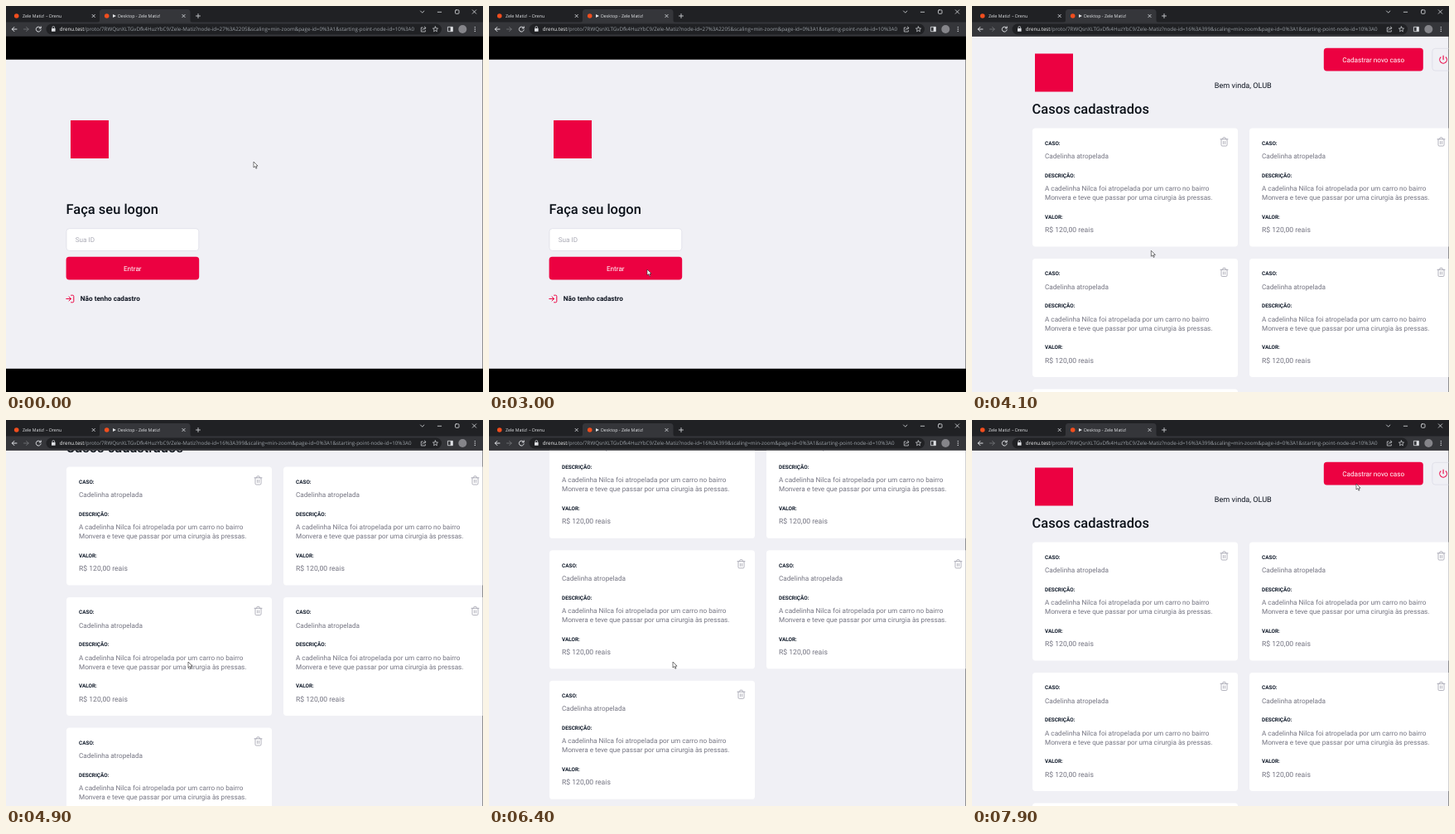
Write an HTML page that moves like this. It is 576x466 px and loops after 8 s.

```html
<!DOCTYPE html>
<html lang="pt">
<head>
<meta charset="utf-8">
<title>Zele Matiz</title>
<style>
  html, body { margin: 0; width: 100%; height: 100%; overflow: hidden; background: #000; }
  svg { display: block; width: 100%; height: 100%; text-rendering: geometricPrecision; }
  text { font-family: Roboto, sans-serif; white-space: pre; }
  .title { font-size: 16.45px; font-weight: 500; fill: #0a1018; }
  .label { font-size: 6.4px; font-weight: 700; fill: #0e1828; }
  .body { font-size: 8.18px; fill: #737380; }
  .price { font-size: 8.6px; fill: #737380; }
  .hint { font-size: 8.1px; fill: #a8a8b3; }
  .action { font-size: 8.2px; font-weight: 400; fill: #fff; text-anchor: middle; }
  .link { font-size: 8.2px; font-weight: 700; fill: #0e1420; }
  .greet { font-size: 9.1px; fill: #0e1420; }
  .chrome text { font-family: "Open Sans", "Noto Sans", sans-serif; }
  .tab { font-size: 5.3px; fill: #e4e6e9; }
  .url { font-size: 6.22px; fill: #9aa0a6; }
  .line { fill: none; stroke-linecap: round; stroke-linejoin: round; }
</style>
</head>
<body>
<svg viewBox="0 0 576 466" preserveAspectRatio="none">
  <defs>
    <clipPath id="urlClip"><rect x="50" y="20" width="445.5" height="16"/></clipPath>
    <clipPath id="viewClip"><rect y="36.5" width="575.6" height="430"/></clipPath>
    <g id="trash" class="line" stroke="#a0a0ac" stroke-width=".8">
      <path d="M0 2H9M2.8 2V.8Q2.8 0 3.6 0H5.4Q6.2 0 6.2 .8V2M1 2V9Q1 10.2 2.2 10.2H6.8Q8 10.2 8 9V2M3.5 4.6V7.7M5.5 4.6V7.7"/>
    </g>
    <g id="card">
      <rect width="248" height="143" rx="3.7" fill="#fff"/>
      <text class="label" x="15" y="20.2">CASO:</text>
      <text class="body" x="15" y="36.6">Cadelinha atropelada</text>
      <text class="label" x="15" y="59.2">DESCRIÇÃO:</text>
      <text class="body" x="15" y="75.6">A cadelinha Nilca foi atropelada por um carro no bairro</text>
      <text class="body" x="15" y="86.6">Monvera e teve que passar por uma cirurgia às pressas.</text>
      <text class="label" x="15" y="109.2">VALOR:</text>
      <text class="price" x="15" y="125.6">R$ 120,00 reais</text>
      <use href="#trash" x="227" y="11.3"/>
    </g>
  </defs>

  <g clip-path="url(#viewClip)">
    <g id="login">
      <rect y="36" width="576" height="430" fill="#000"/>
      <rect y="64.7" width="576" height="373.1" fill="#f0f0f5"/>
      <rect x="78" y="138" width="46" height="46" fill="#ec0141"/>
      <text class="title" x="72.6" y="251">Faça seu logon</text>
      <rect x="73" y="268.7" width="159.8" height="26.8" rx="3.6" fill="#fff" stroke="#dcdce6" stroke-width=".7"/>
      <text class="hint" x="83.8" y="285">Sua ID</text>
      <rect x="72.6" y="302.8" width="160.6" height="27.7" rx="3.7" fill="#ec0141"/>
      <text class="action" x="152.8" y="319.5">Entrar</text>
      <path class="line" stroke="#ec0141" stroke-width="1" d="M78.6 349.2H80.6Q81.8 349.2 81.8 350.4V356.6Q81.8 357.8 80.6 357.8H78.6M76 351L78.5 353.5L76 356M72.8 353.5H78.5"/>
      <text class="link" x="89.8" y="356.4">Não tenho cadastro</text>
    </g>

    <g id="home">
      <rect y="36" width="576" height="430" fill="#f0f0f5"/>
      <g id="scroll">
        <rect x="76" y="57.5" width="46" height="46" fill="#ec0141"/>
        <text class="greet" x="292.8" y="98.7">Bem vinda, OLUB</text>
        <rect x="424.8" y="50.8" width="120" height="27.7" rx="3.7" fill="#ec0141"/>
        <text class="action" x="484.7" y="67.5">Cadastrar novo caso</text>
        <rect x="555.8" y="51.3" width="27" height="26.8" rx="3.7" fill="none" stroke="#dcdce6" stroke-width=".8"/>
        <path class="line" stroke="#ec0141" stroke-width="1.1" d="M566 61.8A4.3 4.3 0 1 0 572.2 61.8M569.1 60V64.6"/>
        <text class="title" x="72.6" y="130.2">Casos cadastrados</text>
        <g id="cards"></g>
      </g>
    </g>
  </g>

  <g class="chrome">
    <rect width="576" height="20.5" fill="#202124"/>
    <rect y="19.5" width="576" height="17.2" fill="#35363a"/>
    <path d="M110 20Q113 20 113 17V7.5Q113 4 116.5 4H219Q222.5 4 222.5 7.5V17Q222.5 20 225.5 20Z" fill="#35363a"/>
    <circle cx="12.7" cy="12" r="2.8" fill="#f24e1e"/>
    <circle cx="121.7" cy="12" r="2.8" fill="#f24e1e"/>
    <text class="tab" x="20" y="14">Zele Matiz! – Drenu</text>
    <path d="M129 9.9L133 12L129 14.1Z" fill="#e4e6e9"/>
    <text class="tab" x="135" y="14">Desktop - Zele Matiz!</text>
    <rect x="48.5" y="21.5" width="477.5" height="13" rx="6.5" fill="#202124"/>
    <g class="line" stroke="#dfe1e5" stroke-width=".8">
      <path d="M104 10.3L107.4 13.7M107.4 10.3L104 13.7M212.8 10.3L216.2 13.7M216.2 10.3L212.8 13.7M232 9.5V14.5M229.5 12H234.5"/>
      <path d="M500.5 6L502.7 8.2L504.9 6M521.3 7.3H525.7M543.4 4.8H546.1Q547 4.8 547 5.7V8.4Q547 9.3 546.1 9.3H543.4Q542.5 9.3 542.5 8.4V5.7Q542.5 4.8 543.4 4.8ZM563.3 4.8L567.7 9.2M567.7 4.8L563.3 9.2"/>
      <path d="M13 28H7.3M9.9 25.4L7.3 28L9.9 30.6M41.7 26.3A3 3 0 1 0 42.2 28.8M42.2 24.9V26.9H40.2" stroke-width="1"/>
      <path d="M21.5 28H27.2M24.6 25.4L27.2 28L24.6 30.6" stroke="#77797d"/>
      <path d="M55.9 27V26A1.4 1.4 0 0 1 58.7 26V27" stroke-width=".7"/>
      <path d="M503.2 26H501.3V31H506.3V29.5M503 29Q503.3 26.7 506.8 26.5M505.3 24.9L507 26.5L505.3 28.1" stroke-width=".7"/>
      <path d="M518.5 24.9L519.4 26.9L521.6 27.1L519.9 28.6L520.4 30.8L518.5 29.6L516.6 30.8L517.1 28.6L515.4 27.1L517.6 26.9Z" stroke-width=".7"/>
      <rect x="533.8" y="25.3" width="5.6" height="5.4"/>
    </g>
    <rect x="55" y="27" width="4.6" height="3.8" rx=".6" fill="#dfe1e5"/>
    <rect x="536.7" y="25.3" width="2.7" height="5.4" fill="#dfe1e5"/>
    <circle cx="551.3" cy="28" r="5" fill="#85858a"/>
    <g fill="#dfe1e5">
      <circle cx="566.3" cy="25.6" r=".7"/><circle cx="566.3" cy="28" r=".7"/><circle cx="566.3" cy="30.4" r=".7"/>
    </g>
    <g clip-path="url(#urlClip)">
      <text class="url" x="64.7" y="30.1"><tspan fill="#f1f3f4">drenu.test</tspan><tspan id="path"></tspan></text>
    </g>
  </g>

  <path id="cursor" d="M0 0V7L1.7 5.5L2.9 8.2L4 7.7L2.9 5.1H5.1Z" fill="#fff" stroke="#222" stroke-width=".6" stroke-linejoin="round"/>
</svg>
<script>
  const LOOP = 8000, STEP = 100;
  const $ = id => document.getElementById(id);
  const login = $('login'), home = $('home'), scroller = $('scroll'), path = $('path'), cursor = $('cursor');

  // keys: time, then one or more values
  const cursorKeys = [
    [0, 299, 188], [300, 338, 214], [1700, 338, 214], [1800, 319, 244],
    [2200, 319, 244], [2600, 191, 318], [3750, 191, 318], [4200, 220, 292],
    [4900, 220, 292], [5100, 222, 292], [7100, 222, 292], [7200, 228, 293], [7900, 464, 77]
  ];
  const scrollKeys = [[4200, 0], [4900, 91], [5000, 91], [5600, 175], [6300, 175], [6700, 0]];

  const clamp = x => Math.min(1, Math.max(0, x));
  const smooth = p => p * p * (3 - 2 * p);

  function sample(keys, t) {
    let i = 0;
    while (i < keys.length - 2 && t >= keys[i + 1][0]) i++;
    const a = keys[i], b = keys[i + 1];
    const p = smooth(clamp((t - a[0]) / (b[0] - a[0])));
    return a.slice(1).map((v, k) => v + (b[k + 1] - v) * p);
  }

  const address = node => '/proto/7RWQsnXLTGvDfk4HuzYbC9/Zele-Matiz?node-id=' + node +
    '&scaling=min-zoom&page-id=0%3A1&starting-point-node-id=10%3A0';

  for (let i = 0; i < 5; i++) {
    const card = document.createElementNS('http://www.w3.org/2000/svg', 'use');
    card.setAttribute('href', '#card');
    card.setAttribute('x', 73 + (i % 2) * 262);
    card.setAttribute('y', 147.5 + Math.floor(i / 2) * 157.5);
    $('cards').append(card);
  }

  function draw(t) {
    const fade = 1 - Math.pow(1 - clamp((t - 3300) / 400), 1.5);
    home.setAttribute('opacity', fade);
    login.setAttribute('visibility', fade < 1 ? 'visible' : 'hidden');
    scroller.setAttribute('transform', `translate(0 ${-sample(scrollKeys, t)[0]})`);
    path.textContent = address(t < 3400 ? '27%3A2205' : '16%3A399');
    cursor.setAttribute('transform', `translate(${sample(cursorKeys, t)})`);
  }

  const start = performance.now();
  function tick() {
    const t = (performance.now() - start) % LOOP;
    draw(Math.floor(t / STEP) * STEP);
    requestAnimationFrame(tick);
  }
  draw(0);
  requestAnimationFrame(tick);
</script>
</body>
</html>
```
